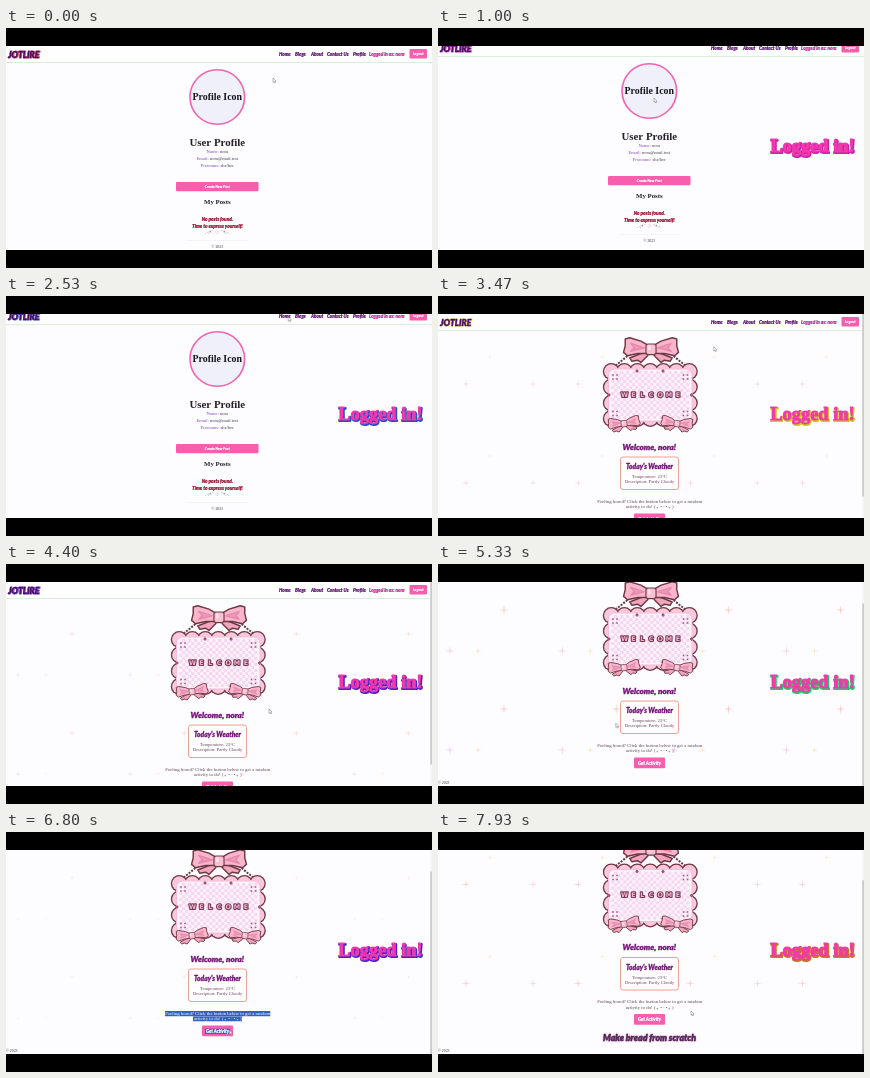
Recreate the animation shown at these times as an HTML page with a canvas. Size 426 px wide and 240 px high, loop 8 s.

```html
<!DOCTYPE html>
<html lang="en">
<head>
<meta charset="utf-8">
<title>Blog profile tour</title>
<style>
html, body { margin: 0; width: 100%; height: 100%; overflow: hidden; background: #000; }
canvas { display: block; width: 100vw; height: 100vh; }
</style>
</head>
<body>
<canvas id="stage"></canvas>
<script>
const W = 426, H = 240, LOOP = 8000, STEP = 200 / 3;
const TOP = 18, BOTTOM = 222;
const HOME_AT = 3270, ACTIVITY_AT = 7270, TOAST_AT = 530, DESELECT_AT = 7130;
const SERIF = '"Liberation Serif", serif';
const SCRIPT = 'Lato, sans-serif';
const PINK = '#f75fac', PURPLE = '#721477', BROWN = '#6d3844';
const canvas = document.getElementById('stage');
const ctx = canvas.getContext('2d');

// Key lists: [time, value, value, ...]
const CURSOR = [
  [0, 268, 52], [400, 258, 56], [1000, 217, 72], [1500, 216, 74], [2350, 284, 23],
  [3270, 280, 22], [4000, 268, 136], [4400, 264, 147], [5330, 179, 161],
  [5700, 160, 181], [6330, 236, 187], [6730, 225, 200], [7270, 220, 200], [7930, 254, 181]
];
const PROFILE_SCROLL = [[0, 0], [400, 0], [730, 6]];
const HOME_SCROLL = [[4600, 0], [5130, 24], [7400, 24], [7730, 35.5]];
const HUE = [[0, 360], [1000, 310], [2530, 225], [4400, -105], [5330, -215], [6800, -465], [7930, -690]];
const SELECT = [[5730, 0], [6600, 1]];
const TILE_W = 112.2, TILE_H = 99;
const EARLY_STARS = [[66, 70], [12, 12], [40, 12]];
const LATE_STARS = [[28, 88], [95, 88], [52, 61]];

function at(keys, t) {
  if (t <= keys[0][0]) return keys[0].slice(1);
  for (let i = 1; i < keys.length; i++) {
    const a = keys[i - 1], b = keys[i];
    if (t <= b[0]) {
      const p = (t - a[0]) / (b[0] - a[0]);
      return a.slice(1).map((v, k) => v + (b[k + 1] - v) * p);
    }
  }
  return keys[keys.length - 1].slice(1);
}

function rect(x, y, w, h, fill, r = 0, stroke) {
  ctx.beginPath();
  ctx.roundRect(x, y, w, h, r);
  if (fill) { ctx.fillStyle = fill; ctx.fill(); }
  if (stroke) { ctx.strokeStyle = stroke; ctx.lineWidth = 1; ctx.stroke(); }
}

function text(str, x, y, size, fill, font = SERIF, style = '', align = 'center') {
  ctx.font = `${style} ${size}px ${font}`;
  ctx.textAlign = align;
  ctx.textBaseline = 'middle';
  ctx.fillStyle = fill;
  ctx.fillText(str, x, y);
}

function script(str, x, y, size, fill, align) {
  text(str, x, y, size, fill, SCRIPT, 'italic 900', align);
  ctx.strokeStyle = fill;
  ctx.lineWidth = size * 0.04;
  ctx.strokeText(str, x, y);
}

function poly(points, fill, stroke = BROWN) {
  ctx.beginPath();
  points.forEach(([x, y]) => ctx.lineTo(x, y));
  ctx.closePath();
  ctx.fillStyle = fill;
  ctx.fill();
  ctx.strokeStyle = stroke;
  ctx.lineWidth = 1.3;
  ctx.lineJoin = 'round';
  ctx.stroke();
}

function header(hue) {
  rect(0, 18, W, 16, '#fefefe');
  rect(0, 34, W, 1, '#dbeedb');
  ctx.font = `italic 900 8.6px ${SCRIPT}`;
  ctx.lineJoin = 'round';
  ctx.lineWidth = 1;
  ctx.strokeStyle = `hsl(${hue} 80% 65%)`;
  ctx.textAlign = 'left';
  ctx.textBaseline = 'middle';
  ctx.strokeText('JOTLIRE', 2.6, 27.6);
  script('JOTLIRE', 2, 27, 8.6, '#4b0d63', 'left');
  const links = [['Home', 273], ['Blogs', 289], ['About', 305], ['Contact Us', 321], ['Profile', 347]];
  for (const [label, x] of links) script(label, x, 26.3, 4.6, '#5a1270', 'left');
  script('Logged in as: nora', 363, 26.3, 4.65, '#c02b92', 'left');
  rect(403.5, 21, 17.5, 9.5, PINK, 1);
  script('Logout', 412.2, 26, 3.6, '#fff');
}

function profile(hue) {
  header(hue);
  ctx.beginPath();
  ctx.arc(211.3, 69, 27.3, 0, 7);
  ctx.fillStyle = '#f0f0fa';
  ctx.fill();
  ctx.strokeStyle = '#f064b0';
  ctx.lineWidth = 1.6;
  ctx.stroke();
  text('Profile Icon', 211.3, 69.3, 9.9, '#17141d', SERIF, 'bold');
  text('User Profile', 211.3, 115, 10.9, '#25202b', SERIF, 'bold');
  const rows = [['Name:', 'nora'], ['Email:', 'nora@mail.test'], ['Pronouns:', 'she/her']];
  rows.forEach(([label, value], i) => {
    const y = 124.2 + i * 7;
    ctx.font = `4.6px ${SERIF}`;
    const lead = ctx.measureText(label + ' ').width;
    const x = 211.3 - (lead + ctx.measureText(value).width) / 2;
    text(label, x, y, 4.6, '#8d45b5', SERIF, '', 'left');
    text(value, x + lead, y, 4.6, '#4b3b52', SERIF, '', 'left');
  });
  rect(170, 154, 82.5, 9.3, PINK, 1);
  script('Create New Post', 211.3, 158.9, 3.5, '#fff');
  text('My Posts', 211.3, 174, 6.8, '#25202b', SERIF, 'bold');
  script('No posts found.', 211.3, 191.4, 4.7, '#960f2e');
  script('Time to express yourself!', 211.3, 198.2, 4.8, '#960f2e');
  text('.·:*¨ ♡ ¨*:·.', 211.3, 205.3, 4.5, '#60405f', '"DejaVu Sans", sans-serif');
  ctx.setLineDash([1, 1]);
  ctx.beginPath();
  ctx.moveTo(181, 212.5);
  ctx.lineTo(242, 212.5);
  ctx.strokeStyle = '#ebe3f2';
  ctx.lineWidth = 0.7;
  ctx.stroke();
  ctx.setLineDash([]);
  text('© 2023', 211.3, 219.3, 3.8, '#333');
}

function sparkle(x, y, r) {
  ctx.beginPath();
  for (let k = 0; k < 8; k++) {
    const d = k % 2 ? r * 0.16 : r, a = k * Math.PI / 4;
    ctx.lineTo(x + d * Math.cos(a), y + d * Math.sin(a));
  }
  ctx.fill();
}

function stars(t) {
  const wave = Math.cos((t - 5500) * Math.PI / 3000);
  const glow = Math.sqrt(Math.abs(wave));
  ctx.globalAlpha = glow;
  (wave > 0 ? EARLY_STARS : LATE_STARS).forEach(([sx, sy], i) => {
    ctx.fillStyle = ['#f7c9c4', '#f3cdf0', '#fbe3b4'][i];
    for (let row = 0; row < 3; row++) {
      for (let col = 0; col < 4; col++) {
        sparkle(sx + col * TILE_W, sy + row * TILE_H, 1 + (i < 2 ? 4 : 2.5) * glow);
      }
    }
  });
  ctx.globalAlpha = 1;
}

function bow(x, y, s, turn = 0) {
  ctx.save();
  ctx.translate(x, y);
  ctx.rotate(turn);
  ctx.scale(s, s);
  for (const side of [-1, 1]) {
    ctx.save();
    ctx.scale(side, 1);
    poly([[2, 2], [9, 4], [19, 8], [17, 11], [12, 10], [9, 12], [3, 6]], '#f3a5bf');
    poly([[2, -3], [9, -7], [19, -10], [23, -9], [23, -3], [24.5, 3], [21, 6], [12, 4], [3, 4]], '#f9b5cc');
    poly([[6, -1], [18, -5], [15, -1], [18, 2]], '#ee98b8', '#e58aae');
    ctx.restore();
  }
  rect(-4.5, -4.5, 9, 9.5, '#f9bfd3', 2, BROWN);
  rect(-2.5, -3, 2, 4, '#fde6f0');
  ctx.restore();
}

function scallops(grow, fill) {
  ctx.fillStyle = fill;
  const dot = (x, y) => {
    ctx.beginPath();
    ctx.arc(x, y, 7.2 + grow, 0, 7);
    ctx.fill();
  };
  for (let i = 0; i < 7; i++) {
    dot(173.3 + i * 13, 75.5);
    dot(173.3 + i * 13, 122.5);
  }
  for (const y of [91, 107]) { dot(173.3, y); dot(251.3, y); }
  ctx.fillRect(172, 74, 80, 50);
}

function sign() {
  ctx.setLineDash([2, 1.3]);
  ctx.strokeStyle = BROWN;
  ctx.lineWidth = 2;
  ctx.beginPath();
  ctx.moveTo(192, 58); ctx.lineTo(177, 70);
  ctx.moveTo(233, 58); ctx.lineTo(248, 70);
  ctx.stroke();
  ctx.setLineDash([]);
  scallops(1.3, BROWN);
  scallops(0, '#fac8dc');
  rect(170.5, 73, 83.5, 52, '#fdf3fb', 6, '#f6bcd8');
  for (let r = 0; r < 16; r++) {
    for (let c = 0; c < 26; c++) {
      if ((r + c) % 2) rect(173.3 + c * 3, 75 + r * 3, 3, 3, '#f6d6f0');
    }
  }
  for (const x of [177, 247.5]) {
    for (const y of [81, 117.5]) {
      for (const [dx, dy] of [[0, 0], [-2, -2], [2, -2], [-2, 2], [2, 2]]) {
        rect(x + dx - 0.8, y + dy - 0.8, 1.6, 1.6, dx ? '#a85a7c' : '#fff');
      }
    }
  }
  for (const [x, y] of [[171, 99], [253.5, 99], [199, 75], [225, 75], [199, 122], [225, 122]]) {
    poly([[x, y - 1], [x + 1, y], [x, y + 1], [x - 1, y]], '#d85f97', '#9c4d70');
  }
  [...'WELCOME'].forEach((ch, i) => {
    const x = 186.5 + i * 8.9;
    ctx.font = '900 6.4px "DejaVu Sans", sans-serif';
    ctx.textAlign = 'center';
    ctx.textBaseline = 'middle';
    ctx.lineWidth = 2.2;
    ctx.strokeStyle = '#743e59';
    ctx.strokeText(ch, x, 99.3);
    ctx.fillStyle = '#f9b4cc';
    ctx.fillText(ch, x, 99.3);
  });
  bow(213, 53, 1.12);
  bow(186, 127.5, 0.66, -0.12);
  bow(239, 127.5, 0.66, 0.12);
}

function selectable(draw, x, y, w, h, part) {
  draw();
  if (part <= 0) return;
  ctx.save();
  ctx.beginPath();
  ctx.rect(x, y - h / 2, w * Math.min(1, part), h);
  ctx.clip();
  rect(x, y - h / 2, w, h, '#2e63c4');
  draw('#fff');
  ctx.restore();
}

function prompt(progress) {
  const line = (str, y) => (fill = '#5a4652') => text(str, 211.7, y, 4.8, fill);
  const first = 'Feeling bored? Click the button below to get a random';
  selectable(line(first, 205.7), 159, 205.7, 105.5, 5.4, progress * 3);
  selectable(line('activity to do! ( ｡ • ᵕ • ｡ )', 210.8), 187, 210.8, 49, 5.2, progress * 3 - 1);
  rect(196, 217.5, 31, 10.8, PINK, 1);
  const label = (fill = '#fff') => script('Get Activity', 211.5, 223.2, 4.5, fill);
  selectable(label, 199, 223.2, 25, 5.6, progress * 3 - 2);
}

function home(t, hue) {
  stars(t);
  header(hue);
  sign();
  script('Welcome, nora!', 211.3, 151.3, 8.1, PURPLE);
  rect(182.5, 161, 58, 32.5, '#fffdfd', 2.5, '#eda094');
  script("Today's Weather", 211.5, 171.3, 6.6, PURPLE);
  text('Temperature: 23°C', 211.5, 181, 4.6, '#67465d');
  text('Description: Partly Cloudy', 211.5, 186, 4.6, '#67465d');
  prompt(t < DESELECT_AT ? at(SELECT, t)[0] : 0);
  const active = t >= ACTIVITY_AT;
  if (active) {
    ctx.shadowColor = '#e79bd8';
    ctx.shadowBlur = 2;
    script('Make bread from scratch', 211.5, 242, 8.75, '#2d0c33');
    ctx.shadowBlur = 0;
  }
  text('© 2023', 0, active ? 255 : 243.5, 3.8, '#333', SERIF, '', 'left');
}

function toast(hue) {
  const str = 'Logged in!', x = 374.5, y = 119;
  ctx.font = `bold 18.4px ${SERIF}`;
  ctx.textAlign = 'center';
  ctx.textBaseline = 'middle';
  ctx.lineJoin = 'round';
  ctx.strokeStyle = `hsl(${hue} 72% 46%)`;
  ctx.lineWidth = 2.2;
  ctx.strokeText(str, x + 0.6, y + 0.8);
  ctx.fillStyle = ctx.strokeStyle = '#f338ab';
  ctx.lineWidth = 0.8;
  ctx.strokeText(str, x, y);
  ctx.fillText(str, x, y);
}

function pointer([x, y]) {
  ctx.beginPath();
  [[0, 0], [0, 4.4], [1, 3.5], [1.8, 5], [2.5, 4.6], [1.8, 3.2], [3.1, 3.1]]
    .forEach(([dx, dy]) => ctx.lineTo(x - 1 + dx, y - 2 + dy));
  ctx.closePath();
  ctx.fillStyle = '#fff';
  ctx.fill();
  ctx.strokeStyle = '#666';
  ctx.lineWidth = 0.45;
  ctx.stroke();
}

function scrollbar(scroll, max) {
  const view = BOTTOM - TOP, k = view / (view + max);
  rect(424.3, TOP, 1.7, view, '#f5f5f5');
  rect(424.3, TOP + scroll * k, 1.7, view * k, '#c9c9cb');
}

function render(t) {
  ctx.setTransform(canvas.width / W, 0, 0, canvas.height / H, 0, 0);
  rect(0, 0, W, H, '#000');
  ctx.save();
  ctx.beginPath();
  ctx.rect(0, TOP, W, BOTTOM - TOP);
  ctx.clip();
  rect(0, TOP, W, BOTTOM - TOP, '#fdfcfe');
  const atHome = t >= HOME_AT;
  const [scroll] = at(atHome ? HOME_SCROLL : PROFILE_SCROLL, t);
  const [hue] = at(HUE, t);
  ctx.save();
  ctx.translate(0, -scroll);
  if (atHome) home(t, hue);
  else profile(hue);
  ctx.restore();
  if (atHome) scrollbar(scroll, t < ACTIVITY_AT ? 24 : 35.5);
  if (t >= TOAST_AT) toast(hue);
  pointer(at(CURSOR, t));
  ctx.restore();
}

function resize() {
  const ratio = window.devicePixelRatio || 1;
  canvas.width = Math.round(innerWidth * ratio);
  canvas.height = Math.round(innerHeight * ratio);
}

function frame() {
  const t = performance.now() % LOOP;
  render(Math.floor((t + 5) / STEP) * STEP % LOOP);
  requestAnimationFrame(frame);
}

addEventListener('resize', resize);
resize();
frame();
</script>
</body>
</html>
```
